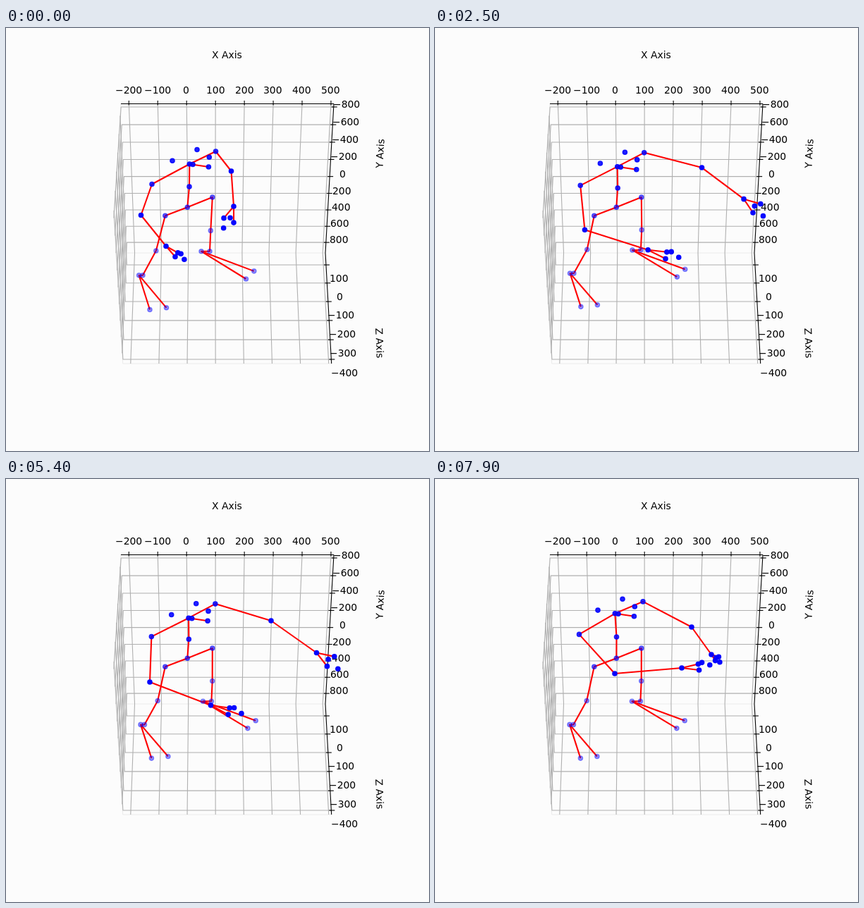
Recreate the animation shown at these times as an HTML page with a canvas. Size 600 px wide and 600 px high, loop 8000 ms.

```html
<!DOCTYPE html>
<html>
<head>
<meta charset="utf-8">
<style>
html, body { margin: 0; width: 100%; height: 100%; overflow: hidden; background: #fcfcfc; }
canvas { display: block; }
</style>
</head>
<body>
<canvas id="stage" width="600" height="600"></canvas>
<script>
const ctx = document.getElementById('stage').getContext('2d');
const LOOP = 8000, STEP = 100;
const lerp = (a, b, u) => a + (b - a) * u;
const between = (p, q, u) => p.map((v, i) => lerp(v, q[i], u));

// Standing body; joints named by side as seen on screen
const legs = {
  kneeL: [218.8, 312.3], ankleL: [200, 345], heelL: [194.6, 345], toeL: [210, 391], tipL: [233.5, 388.5],
  kneeR: [296.3, 285.3], ankleR: [295, 313], heelR: [283, 313], toeR: [346.5, 350], tipR: [357.8, 339.5]
};
const hips = { pelvis: [257.3, 254.2], hipL: [225.8, 266.3], hipR: [292.8, 240] };
const chest = { spine: [258, 225.6], shoulderL: [205, 222], shoulderR: [295.5, 175.5] };
const head = {
  neck: [256.3, 194], nose: [261, 194.5], chin: [283.4, 198],
  earL: [232, 189.3], crown: [267, 173.5], earR: [284.3, 184.2]
};

// Each finger: turn from the hand's direction in degrees, share of its length
const fingersL = [[13, .62], [-7, .6], [-9, .74], [0, 1]];
const fingersR = [[-25, .68], [-8, .5], [15, .64], [0, 1]];

const bones = [
  'pelvis hipL kneeL ankleL heelL toeL', 'heelL tipL',
  'pelvis hipR kneeR ankleR heelR toeR', 'heelR tipR',
  'pelvis spine neck chin', 'neck shoulderL elbowL wristL handL0', 'wristL handL1',
  'neck shoulderR elbowR wristR handR0', 'wristR handR2'
].map(b => b.split(' '));

// squat, head shift; elbow and wrist of each arm; hand length and angle
const rest = { body: [1, 4, -1], armL: [191.5, 265.5, 227, 309.5], armR: [319.5, 203, 323, 253], handL: [32, 36], handR: [34, 115] };
const reach = { body: [0, .5, -.5], armL: [264, 276, 373, 277], armR: [394, 180, 423, 219], handL: [44, 4], handR: [27, 67] };
const lower = { body: [0, -1, .2], armL: [246.5, 277, 343, 271.5], armR: [381, 193.5, 414.5, 240], handL: [44, 6], handR: [29, 73] };
const raise = { body: [.1, .3, .2], armL: [253.5, 277.5, 355, 279], armR: [389, 203.5, 419, 243], handL: [47, 0], handR: [23, 51] };
const stretch = { body: [.6, 2.7, 3.2], armL: [204, 288, 290.5, 321], armR: [376, 201, 440.5, 246.5], handL: [45, 15], handR: [38, 37] };
const gather = { body: [-.1, -.7, -.2], armL: [252, 279.5, 347.5, 274.5], armR: [366.5, 195.5, 405.5, 242], handL: [41, -4], handR: [28, 62] };
const fold = { body: [.6, -1, -3.2], armL: [255, 276, 350, 268], armR: [364, 210, 392, 249], handL: [40, -6], handR: [16, 42] };

const mix = (a, b, u) => Object.fromEntries(Object.keys(a).map(k => [k, between(a[k], b[k], u)]));
const keys = [
  [0, rest], [950, { ...mix(rest, stretch, .88), body: [1.6, 2, -3] }], [1700, reach],
  [2700, mix(reach, stretch, .95)], [3400, lower], [4600, raise], [5400, stretch], [6400, gather], [7900, fold]
];

function stateAt(t) {
  const k = Math.max(1, keys.findIndex(key => key[0] >= t));
  const [t0, a] = keys[k - 1], [t1, b] = keys[k];
  return mix(a, b, (1 - Math.cos(Math.PI * (t - t0) / (t1 - t0))) / 2);
}

function buildJoints(state) {
  const joints = {}, [squat, dx, dy] = state.body;
  const place = (group, alpha, move) => {
    for (const name in group) joints[name] = { p: move(group[name]), alpha };
  };
  place(legs, .42, ([x, y]) => [x - 6 * squat, y + (y - 250) * .06 * squat]);
  place(hips, .6, p => p);
  place(chest, .82, ([x, y]) => [x + dx / 2, y + dy / 2]);
  place(head, .88, ([x, y]) => [x + dx, y + dy]);
  const arm = (side, [ex, ey, wx, wy], [size, angle], fingers) => {
    const parts = { ['elbow' + side]: [ex, ey], ['wrist' + side]: [wx, wy] };
    fingers.forEach(([turn, share], i) => {
      const a = (angle + turn) * Math.PI / 180;
      parts['hand' + side + i] = [wx + size * share * Math.cos(a), wy + size * share * Math.sin(a)];
    });
    place(parts, .97, p => p);
  };
  arm('L', state.armL, state.handL, fingersL);
  arm('R', state.armR, state.handR, fingersR);
  return joints;
}

function path(points, color, width) {
  ctx.beginPath();
  points.forEach(p => ctx.lineTo(p[0], p[1]));
  ctx.strokeStyle = color;
  ctx.lineWidth = width;
  ctx.stroke();
}

function text(label, x, y, angle = 0) {
  const str = String(label).replace('-', '\u2212');
  const half = ctx.measureText(str).width / 2;
  ctx.save();
  if (angle) {
    ctx.translate(x, y);
    ctx.rotate(angle * Math.PI / 180);
    ctx.fillText(str, -half, 5);
  } else {
    ctx.fillText(str, Math.round(x - half), Math.round(y + 5));
  }
  ctx.restore();
}

// Corners of the three visible panes
const topL = [163, 107.5], topR = [465, 107.5], midL = [172, 319], midR = [453, 319];
const lowL = [165.7, 476], lowR = [461.7, 476], near = [152.7, 265];
const GRID = '#b0b0b0', EDGE = '#ebebeb', INK = '#000';

function drawAxes() {
  ctx.fillStyle = '#fcfcfc';
  ctx.fillRect(0, 0, 600, 600);
  path([midL, midR], EDGE, 1);
  path([near, lowL, lowR], EDGE, 1);
  path([topL, near], EDGE, 1);
  ctx.fillStyle = INK;
  ctx.font = '13.9px "DejaVu Sans", sans-serif';

  const marks = [];
  const sideTick = ([x, y]) => marks.push([[x - 3, y], [x + 5, y]]);
  for (let i = 0; i < 8; i++) {
    const x = 174.3 + 40.95 * i, u = (x - topL[0]) / (topR[0] - topL[0]);
    path([between(topL, topR, u), between(midL, midR, u), between(lowL, lowR, u)], GRID, 1.1);
    marks.push([[x, 103], [x, 109.5]]);
    text(i * 100 - 200, x - .3, 88);
  }
  // Tick spacing shrinks with depth
  for (let i = 0; i < 9; i++) {
    const y = 112 + 25.3 * i - .16 * i * i;
    const u = (y - topL[1]) / (midL[1] - topL[1]), right = between(topR, midR, u);
    path([between(near, lowL, u), between(topL, midL, u), right], GRID, 1.1);
    sideTick(right);
    text(i * 200 - 800, lerp(483.5, 472, i / 8), y - 4);
  }
  for (let i = 0; i < 6; i++) {
    const y = 336 + 25.5 * i + .26 * i * i;
    const u = (y - midL[1]) / (lowL[1] - midL[1]), right = between(midR, lowR, u);
    path([between(topL, near, u), between(midL, lowL, u), right], GRID, 1.1);
    sideTick(right);
    text(100 - i * 100, lerp(472, 480, i / 5), y + 19);
  }
  path([topL, topR], INK, 1.1);
  path([topR, midR, lowR], INK, 1.1);
  marks.forEach(m => path(m, INK, 1.1));
  text('X Axis', 313.5, 38);
  text('Y Axis', 530.5, 178, -87);
  text('Z Axis', 530, 447, 87.5);
}

function drawFigure(t) {
  const joints = buildJoints(stateAt(t));
  ctx.lineJoin = 'round';
  bones.forEach(b => path(b.map(name => joints[name].p), '#f00', 2.08));
  ctx.lineWidth = 1.4;
  ctx.fillStyle = ctx.strokeStyle = '#00f';
  for (const { p, alpha } of Object.values(joints)) {
    ctx.globalAlpha = alpha;
    ctx.beginPath();
    ctx.arc(p[0], p[1], 3.1, 0, 7);
    ctx.fill();
    ctx.stroke();
  }
  ctx.globalAlpha = 1;
}

const start = performance.now();
function frame() {
  const t = (performance.now() - start) % LOOP;
  drawAxes();
  drawFigure(Math.floor(t / STEP) * STEP);
  requestAnimationFrame(frame);
}
frame();
</script>
</body>
</html>
```
